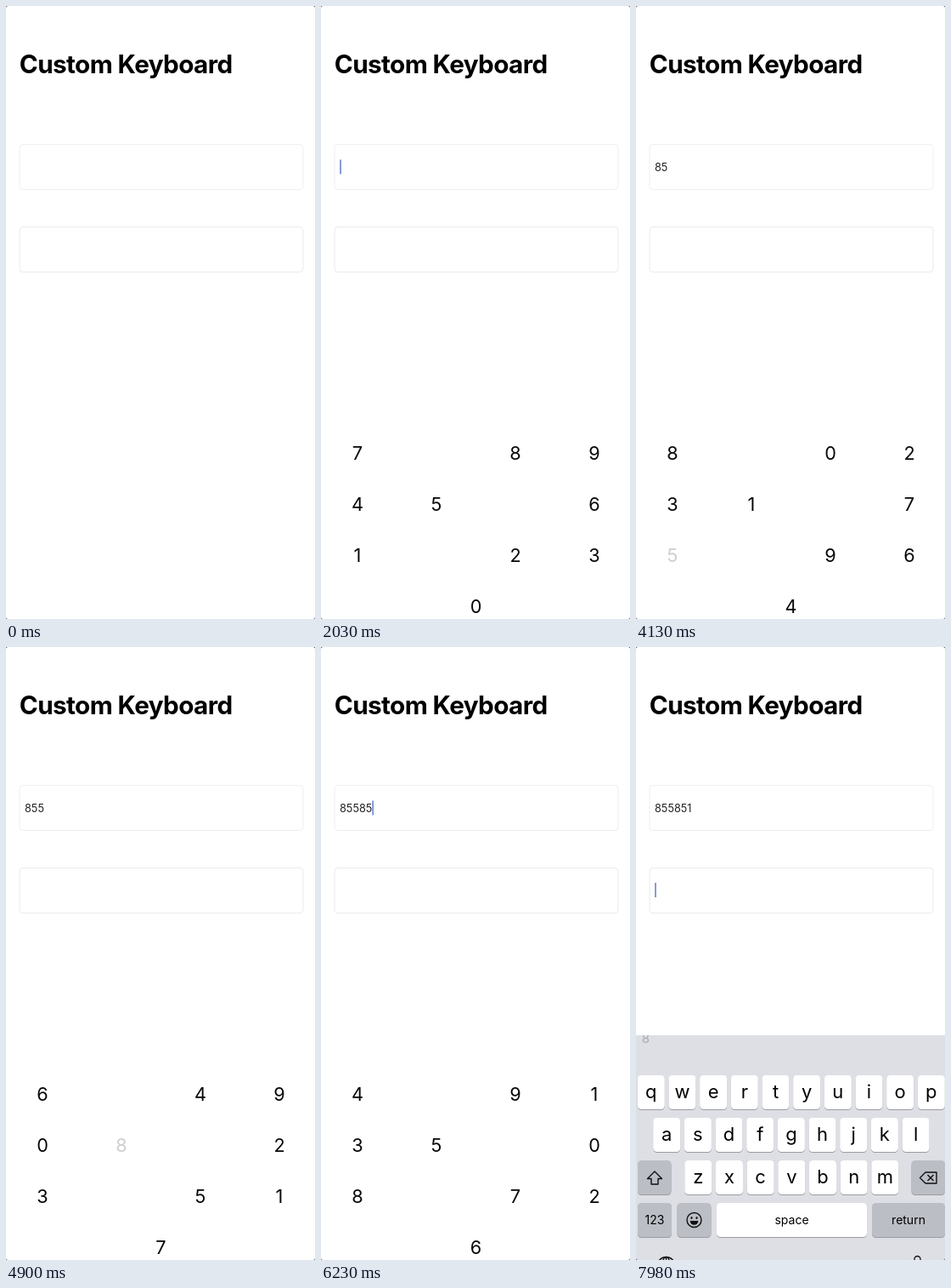
Write an HTML page with a canvas that moves like this. It is 364x720 px and loops after 8 s.

```html
<!DOCTYPE html>
<html lang="en">
<head>
<meta charset="utf-8">
<title>Custom Keyboard</title>
<style>
html, body { margin: 0; width: 364px; height: 720px; overflow: hidden; background: #fff; }
canvas { display: block; }
</style>
</head>
<body>
<canvas id="stage" width="364" height="720"></canvas>
<script>
const W = 364, H = 720, LOOP = 8000;
const ctx = document.getElementById('stage').getContext('2d');
const FONT = 'Inter, Roboto, sans-serif';

const SHOW = 1500, SWAP = 7830;
const FIRST = '7894561230';
// each tap: finger down, finger up, digit typed, next key order
const TAPS = [
  { down: 2500, up: 2647, digit: '8', keys: '7041562398' },
  { down: 3330, up: 3470, digit: '5', keys: '8023175964' },
  { down: 4050, up: 4240, digit: '5', keys: '6490823517' },
  { down: 4860, up: 5000, digit: '8', keys: '1247689035' },
  { down: 5600, up: 5735, digit: '5', keys: '4913508726' },
  { down: 6560, up: 6660, digit: '1', keys: '8269037154' }
];
const COLS = [43, 229, 322];
const SPOTS = [...'0123456789'].map((_, i) => ({
  x: i === 9 ? 182.5 : i === 4 ? 136 : COLS[i % 3],
  y: 525.5 + 60 * Math.floor(i / 3)
}));

const clamp = v => Math.max(0, Math.min(1, v));
const easeOut = (v, power = 3) => 1 - Math.pow(1 - clamp(v), power);

function label(str, x, y, size, { weight = 400, color = '#000', align = 'center', spacing = 0 } = {}) {
  ctx.font = `${weight} ${size}px ${FONT}`;
  ctx.letterSpacing = spacing + 'px';
  ctx.textAlign = align;
  ctx.fillStyle = color;
  ctx.fillText(str, x, y);
}

function box(x, y, w, h, r) {
  ctx.beginPath();
  ctx.roundRect(x, y, w, h, r);
}

function line(width, color, ...points) {
  ctx.lineWidth = width;
  ctx.strokeStyle = color;
  ctx.lineJoin = 'round';
  ctx.beginPath();
  points.forEach(([x, y]) => ctx.lineTo(x, y));
}

function drawPage() {
  ctx.fillStyle = '#fff';
  ctx.fillRect(0, 0, W, H);
  label('Custom Keyboard', 15.8, 78.6, 29.7, { weight: 700, align: 'left', spacing: -0.6 });
  ctx.lineWidth = 1;
  ctx.strokeStyle = '#efefef';
  box(16, 162.5, 334, 53, 4);
  ctx.stroke();
  ctx.strokeStyle = '#eaeaea';
  box(16, 259.5, 334, 53, 4);
  ctx.stroke();
}

function cursorAlpha(age) {
  const a = age % 960;
  if (age > 960 && a < 100) return a / 100;
  return 1 - clamp((a - 560) / 100);
}

function drawCursor(x, y, alpha) {
  ctx.globalAlpha = alpha;
  ctx.fillStyle = '#5870c4';
  ctx.fillRect(x, y, 1.4, 17);
  ctx.globalAlpha = 1;
}

function drawFields(t) {
  const done = TAPS.filter(k => t >= k.up);
  const value = done.map(k => k.digit).join('');
  label(value, 22, 193.6, 12.7, { align: 'left', color: '#222' });
  if (t >= SWAP) return drawCursor(22.3, 277, 1);
  if (t < SHOW) return;
  const since = done.length ? done[done.length - 1].up : SHOW;
  const end = 22.3 + (value ? ctx.measureText(value).width - 0.2 : 0);
  drawCursor(end, 180.5, cursorAlpha(t - since));
}

function drawPad(t) {
  if (t < SHOW) return;
  const n = TAPS.filter(k => t >= k.up).length;
  const last = TAPS[n - 1], next = TAPS[n];
  const now = n ? last.keys : FIRST;
  const before = n > 1 ? TAPS[n - 2].keys : FIRST;
  const age = last ? t - last.up : 0;
  const slide = 240 * (1 - easeOut((t - SHOW) / 600, 5));
  SPOTS.forEach((p, i) => {
    let key = now[i], alpha = 1;
    if (last && before[i] !== key) {
      if (age < 200) {
        key = before[i];
        alpha = (key === last.digit ? 0.2 : 1) * (1 - clamp(age / 140));
      } else {
        alpha = easeOut((age - 200) / 320);
      }
    }
    if (next && t >= next.down && key === next.digit) alpha = 0.2;
    ctx.globalAlpha = alpha;
    label(key, p.x, p.y + 7.9 + slide, 21.7, { color: '#080808' });
  });
  ctx.globalAlpha = 1;
}

function key(x, y, w, text, size, dark) {
  ctx.fillStyle = '#9a9ca2';
  box(x, y + 1, w, 40, 4.5);
  ctx.fill();
  ctx.fillStyle = dark ? '#bcbec6' : '#fff';
  box(x, y, w, 40, 4.5);
  ctx.fill();
  if (text) label(text, x + w / 2, y + (size > 20 ? 26.5 : 25), size);
}

function keyRow(letters, x, y) {
  [...letters].forEach((c, i) => key(x + 36.67 * i, y, 32, c, 22));
}

function ring(x, y, r, width) {
  ctx.lineWidth = width;
  ctx.strokeStyle = '#111';
  ctx.beginPath();
  ctx.arc(x, y, r, 0, 7);
  ctx.stroke();
}

function drawIcons() {
  // shift
  line(1.4, '#111', [22, 616], [30.5, 624.5], [26, 624.5], [26, 631], [18, 631], [18, 624.5], [13.5, 624.5]);
  ctx.closePath();
  ctx.stroke();
  // delete
  line(1.4, '#111', [334.5, 623.5], [341, 617], [354, 617], [354, 630], [341, 630]);
  ctx.closePath();
  ctx.stroke();
  line(1.4, '#111', [343.5, 620], [350.5, 627]);
  ctx.stroke();
  line(1.4, '#111', [350.5, 620], [343.5, 627]);
  ctx.stroke();
  // smiley
  ring(68.5, 673, 8.5, 1.4);
  ctx.fillStyle = '#111';
  for (const x of [65.5, 71.5]) {
    ctx.beginPath();
    ctx.ellipse(x, 670.5, 1.1, 1.5, 0, 0, 7);
    ctx.fill();
  }
  ctx.beginPath();
  ctx.arc(68.5, 674, 4.8, 0, Math.PI);
  ctx.closePath();
  ctx.fill();
  // globe
  ring(35.5, 727, 10.5, 1.3);
  ctx.beginPath();
  ctx.ellipse(35.5, 727, 4.8, 10.5, 0, 0, 7);
  ctx.stroke();
  line(1.3, '#111', [35.5, 716], [35.5, 738]);
  ctx.stroke();
  line(1.3, '#111', [27, 721], [44, 721]);
  ctx.stroke();
  // microphone
  ctx.lineWidth = 1.3;
  box(328, 715.5, 7, 13, 3.5);
  ctx.stroke();
}

function drawSystemBoard(t) {
  const k = clamp((t - SWAP) / 140);
  ctx.save();
  ctx.globalAlpha = 0.45 + 0.55 * k;
  ctx.translate(0, 44 * (1 - k));
  ctx.fillStyle = '#dedfe5';
  ctx.fillRect(0, 456, W, H);
  ctx.save();
  ctx.beginPath();
  ctx.rect(0, 456, W, 40);
  ctx.clip();
  label('8', 11.5, 464.5, 15, { color: '#a9aaaf' });
  ctx.restore();
  keyRow('qwertyuiop', 1.8, 503);
  keyRow('asdfghjkl', 20.2, 553);
  keyRow('zxcvbnm', 57.3, 603);
  key(2, 603, 39.5, '', 0, true);
  key(324.5, 603, 39.5, '', 0, true);
  key(2, 653, 40, '123', 14, true);
  key(48.5, 653, 40, '', 0, true);
  key(95, 653, 177, 'space', 14);
  key(278, 653, 86, 'return', 14, true);
  drawIcons();
  ctx.restore();
}

function drawCorners() {
  ctx.fillStyle = '#555';
  ctx.beginPath();
  ctx.rect(0, 0, W, H);
  ctx.roundRect(0, 0, W, H, 2.5);
  ctx.fill('evenodd');
}

function draw(t) {
  drawPage();
  drawFields(t);
  drawPad(t);
  if (t >= SWAP) drawSystemBoard(t);
  drawCorners();
}

const start = performance.now();
function tick() {
  draw((performance.now() - start) % LOOP);
  requestAnimationFrame(tick);
}
tick();
</script>
</body>
</html>
```
